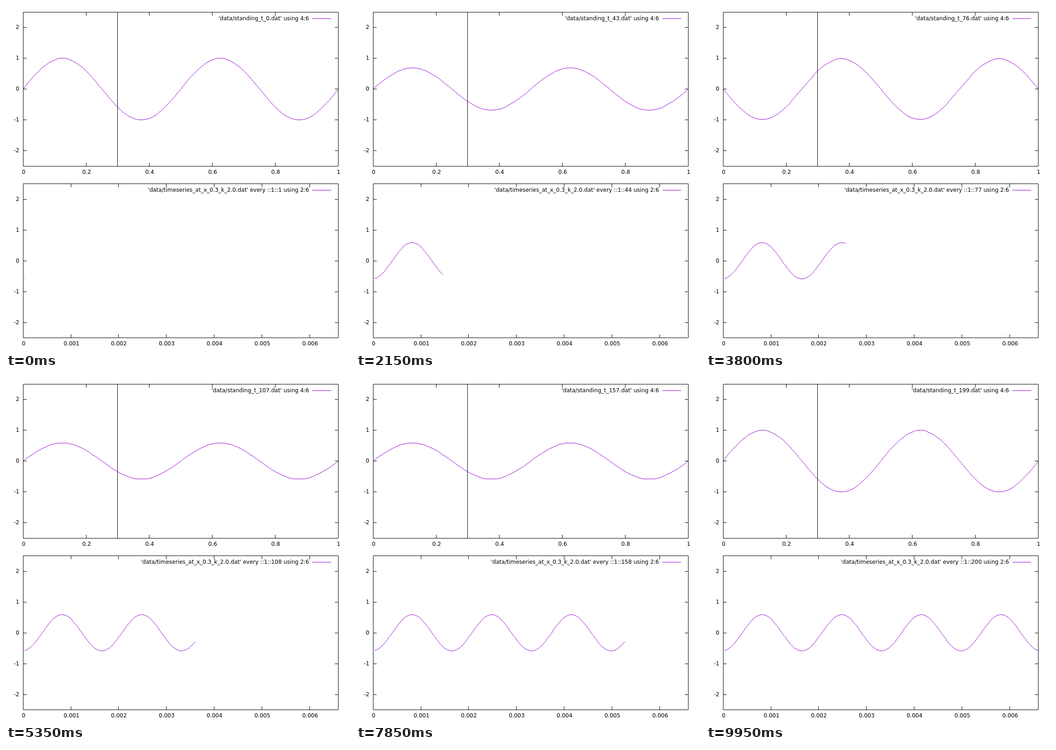
Animation, 748 px wide and 748 px high, one loop 10 s. Source, as an HTML page:

```html
<!DOCTYPE html>
<html>
<head>
<meta charset="utf-8">
<title>Standing wave</title>
<style>
html, body { margin: 0; width: 100%; height: 100%; overflow: hidden; background: #fff; }
svg { display: block; }
path, polyline { fill: none; stroke: #000; stroke-width: 1; }
.wave { stroke: #9400d3; }
text { font: 12px "DejaVu Sans", sans-serif; white-space: pre; }
.end { text-anchor: end; }
.mid { text-anchor: middle; }
</style>
</head>
<body>
<svg id="stage" width="748" height="748" viewBox="0 0 748 748"></svg>
<script>
const stage = document.getElementById('stage');
const LEFT = 36.6, WIDTH = 685.8, UNIT = 67;
const FRAMES = 200, FRAME_MS = 50, PERIOD = 50;

// Centre of the nearest pixel
const snap = v => Math.round(v) + 0.5;

function add(tag, attrs, text = '') {
  const node = document.createElementNS('http://www.w3.org/2000/svg', tag);
  for (const key in attrs) node.setAttribute(key, attrs[key]);
  node.textContent = text;
  return stage.appendChild(node);
}

function makePlot({ zero, keyY, xMax, xStep, marker }) {
  const px = x => snap(LEFT + x / xMax * WIDTH);
  const py = y => snap(zero - y * UNIT);
  const left = px(0), right = px(xMax), top = py(2.5), bottom = py(-2.5);

  if (marker) add('path', { d: `M${px(marker)} ${top}V${bottom}` });
  const curve = add('polyline', { class: 'wave' });

  let d = `M${left} ${top}H${right}V${bottom}H${left}Z`;
  for (let y = -2; y <= 2; y++) {
    d += `M${left} ${py(y)}h7.5M${right} ${py(y)}h-7.5`;
    add('text', { class: 'end', x: 29, y: py(y) + 3.5 }, y);
  }
  for (let i = 0; i * xStep <= xMax * 1.0001; i++) {
    const x = px(i * xStep);
    d += `M${x} ${top}v7.5M${x} ${bottom}v-7.5`;
    add('text', { class: 'mid', x: x + 0.9, y: bottom + 16 }, +(i * xStep).toFixed(3));
  }
  add('path', { d });

  const label = add('text', { class: 'end', x: 659, y: keyY + 4 });
  add('path', { class: 'wave', d: `M666 ${keyY + 0.5}H707` });

  return (title, points) => {
    label.textContent = title;
    const dots = points.map(([x, y]) => [px(x), py(y)]);
    if (dots.length === 1) dots.push([dots[0][0] + 1, dots[0][1]]);
    curve.setAttribute('points', dots.join(' '));
  };
}

const drawWave = makePlot({ zero: 180.1, keyY: 27, xMax: 1, xStep: 0.2, marker: 0.3 });
const drawSeries = makePlot({ zero: 553.7, keyY: 400, xMax: 0.0066, xStep: 0.001 });

const wave = (x, step) =>
  Math.sin(4 * Math.PI * x) * Math.cos(2 * Math.PI * (step + 0.5) / PERIOD);

let shown = -1;
function tick() {
  const n = Math.floor(performance.now() / FRAME_MS) % FRAMES;
  if (n !== shown) {
    shown = n;
    drawWave(`'data/standing_t_${n}.dat' using 4:6`,
      Array.from({ length: 101 }, (_, i) => [i / 100, wave(i / 100, n)]));
    // The series is cut off at the right border
    drawSeries(`'data/timeseries_at_x_0.3_k_2.0.dat' every ::1::${n + 1} using 2:6`,
      Array.from({ length: Math.min(n + 1, 198) }, (_, i) => [(i + 1) / 30000, wave(0.3, i + 1)]));
  }
  requestAnimationFrame(tick);
}
tick();
</script>
</body>
</html>
```
